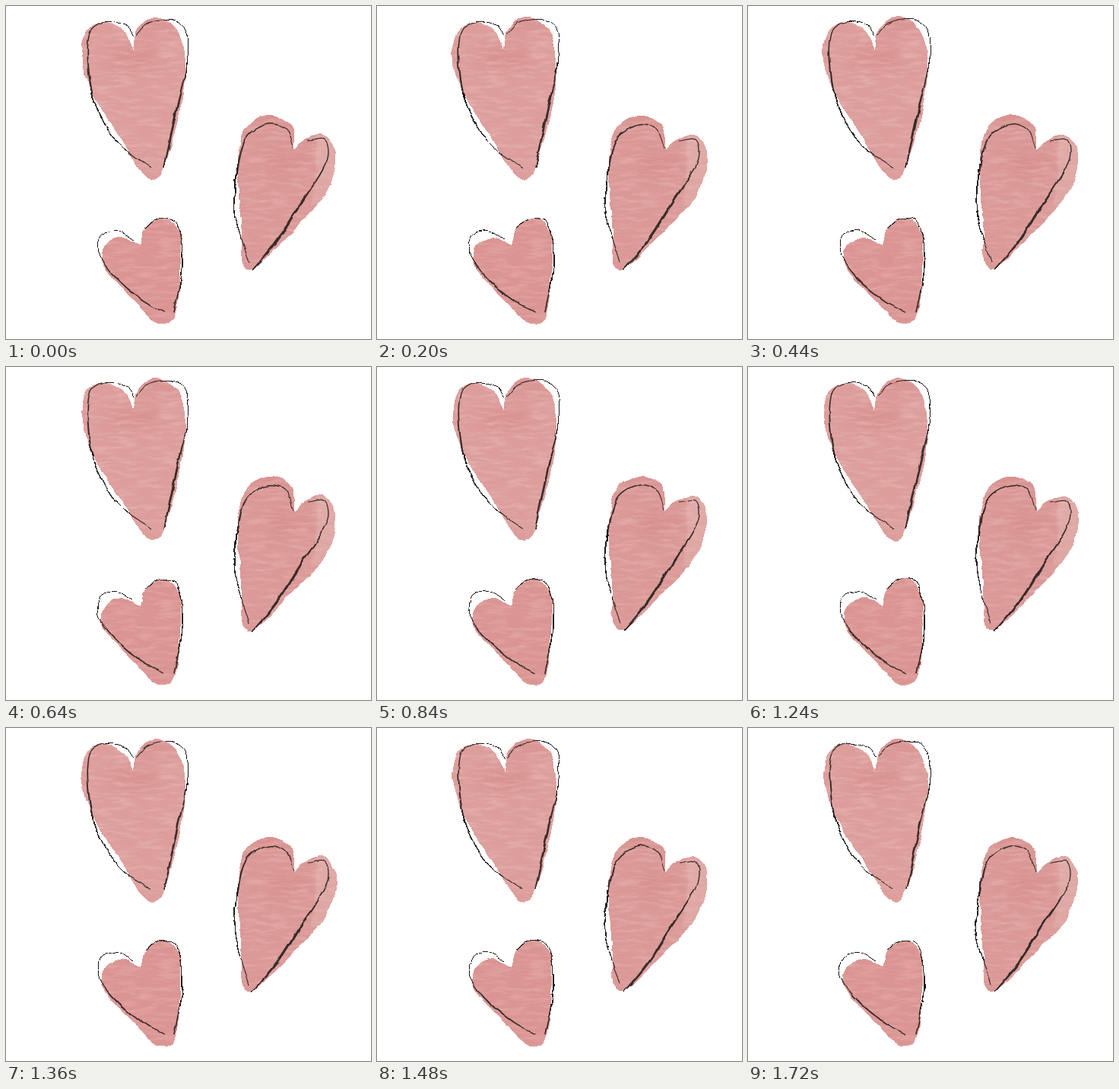
Write an HTML page that moves like this. It is 480 by 437 pixels and loops after 1760 ms.

```html
<!DOCTYPE html>
<html lang="en">
<head>
<meta charset="utf-8">
<title>Wobbling hearts</title>
<style>
  html, body { margin: 0; width: 100%; height: 100%; overflow: hidden; background: #fff; }
  svg { display: block; width: 100%; height: 100%; }
</style>
</head>
<body>
<svg viewBox="0 0 480 437">
  <defs>
    <!-- wobble the drawing, then harden its outer edge -->
    <filter id="wobble" filterUnits="userSpaceOnUse" x="0" y="0" width="480" height="437" color-interpolation-filters="sRGB">
      <feTurbulence id="noise" type="fractalNoise" baseFrequency=".045" numOctaves="2" seed="1" result="n"/>
      <feDisplacementMap in="SourceGraphic" in2="n" scale="6" xChannelSelector="R" yChannelSelector="G"/>
      <feComponentTransfer><feFuncA type="discrete" tableValues="0 1"/></feComponentTransfer>
    </filter>
    <filter id="grain" filterUnits="userSpaceOnUse" x="0" y="0" width="480" height="437" color-interpolation-filters="sRGB">
      <feTurbulence type="fractalNoise" baseFrequency=".035 .22" numOctaves="3" seed="8"/>
      <feColorMatrix values="0 0 0 0 1  0 0 0 0 .9  0 0 0 0 .88  .9 0 0 0 -.36"/>
    </filter>
    <filter id="soft" x="-50%" y="-50%" width="200%" height="200%"><feGaussianBlur stdDeviation="9"/></filter>
    <filter id="slight" x="-50%" y="-50%" width="200%" height="200%"><feGaussianBlur stdDeviation="1.5"/></filter>
    <clipPath id="clip"></clipPath>
  </defs>
  <g filter="url(#wobble)">
    <g id="fills"></g>
    <g clip-path="url(#clip)">
      <g filter="url(#soft)" fill="#d58c8a" opacity=".6">
        <ellipse cx="168" cy="68" rx="34" ry="16"/>
        <ellipse cx="200" cy="24" rx="26" ry="10"/>
        <ellipse cx="350" cy="148" rx="30" ry="10"/>
        <ellipse cx="370" cy="205" rx="28" ry="14"/>
      </g>
      <path d="M407 160H445V262H400Q411 225 407 160Z" fill="#e0b0ac" opacity=".65" filter="url(#slight)"/>
      <rect width="480" height="437" filter="url(#grain)" opacity=".6"/>
    </g>
    <g id="lines" fill="#1c1816" opacity=".85"></g>
  </g>
</svg>
<script>
const FRAME = 40, FRAMES = 44;

// Smooth curve through "x,y x,y ..." as cubic path data.
function curve(text) {
  const pts = text.split(' ').map(pair => pair.split(',').map(Number));
  const at = i => pts[Math.max(0, Math.min(pts.length - 1, i))];
  const gap = (a, b) => Math.hypot(b[0] - a[0], b[1] - a[1]);
  const slope = (i, k) => (at(i + 1)[k] - at(i - 1)[k]) / (gap(at(i - 1), at(i)) + gap(at(i), at(i + 1)));
  let d = 'M' + pts[0];
  for (let i = 1; i < pts.length; i++) {
    const reach = gap(pts[i - 1], pts[i]) / 3;
    const from = pts[i - 1].map((v, k) => v + slope(i - 1, k) * reach);
    const to = pts[i].map((v, k) => v - slope(i, k) * reach);
    d += `C${from} ${to} ${pts[i]}`;
  }
  return d;
}

function makePath(d) {
  const path = document.createElementNS('http://www.w3.org/2000/svg', 'path');
  path.setAttribute('d', d);
  return path;
}

const add = (id, path) => document.getElementById(id).append(path);

// The outline starts and ends at the notch.
function heart(color, text) {
  const path = makePath(curve(text) + 'Z');
  add('clip', path.cloneNode());
  path.setAttribute('fill', color);
  add('fills', path);
}

// A pen line whose width follows evenly spaced stops.
function stroke(text, ...widths) {
  const guide = makePath(curve(text));
  const length = guide.getTotalLength();
  const steps = Math.ceil(length / 3);
  const left = [], right = [];
  for (let i = 0; i <= steps; i++) {
    const s = length * i / steps;
    const p = guide.getPointAtLength(s);
    const a = guide.getPointAtLength(Math.max(0, s - 1));
    const b = guide.getPointAtLength(Math.min(length, s + 1));
    const u = i / steps * (widths.length - 1), n = Math.min(widths.length - 2, Math.floor(u));
    const width = widths[n] + (widths[n + 1] - widths[n]) * (u - n);
    const k = width / 2 / Math.hypot(b.x - a.x, b.y - a.y);
    const dx = (b.x - a.x) * k, dy = (b.y - a.y) * k;
    left.push([p.x - dy, p.y + dx]);
    right.unshift([p.x + dy, p.y - dx]);
  }
  add('lines', makePath('M' + left.concat(right).join('L') + 'Z'));
}

heart('#dc9d9b', '167,57 156,34 130,21 106,33 100,72 119,124 152,175 178,217 193,228 205,219 227,145 236,78 226,32 197,14 173,30 167,57');
heart('#da9896', '379,190 375,156 347,143 316,159 305,205 310,300 311,337 323,346 378,295 421,245 434,195 418,169 393,176 379,190');
heart('#da9492', '177,314 152,303 129,316 128,342 166,384 199,416 220,411 229,348 227,295 207,278 184,292 177,314');

stroke('168,39 157,25 129,21 111,33 108,76 118,130 148,180 191,212', 1, 1.1, 1.7, 2.2, 1.7, 1.2, 1.1);
stroke('171,38 188,22 220,18 237,32 238,75 226,128 208,212', 1, 1.2, 1, 1.4, 2.5, 2.8, 1.7);
stroke('378,188 368,162 345,155 317,172 305,212 301,270 320,337', 0.9, 1.4, 1.7, 2.5, 1.8, 1.3, 1.1);
stroke('397,177 420,176 422,203 386,262 355,310 324,347', 1, 1.4, 2, 3.2, 3.2, 1.7);
stroke('168,306 148,295 126,300 122,325 142,355 180,387 208,402', 1, 1, 1.1, 2, 1.7, 1.3);
stroke('183,292 200,279 224,285 232,340 221,402', 1, 1.2, 1.3, 1.8, 1.7);

const noise = document.getElementById('noise');
const start = performance.now();
let shown = -1;
function draw() {
  const frame = Math.floor(Math.max(0, performance.now() - start) / FRAME) % FRAMES;
  if (frame !== shown) noise.setAttribute('seed', (shown = frame) + 1);
  requestAnimationFrame(draw);
}
draw();
</script>
</body>
</html>
```
